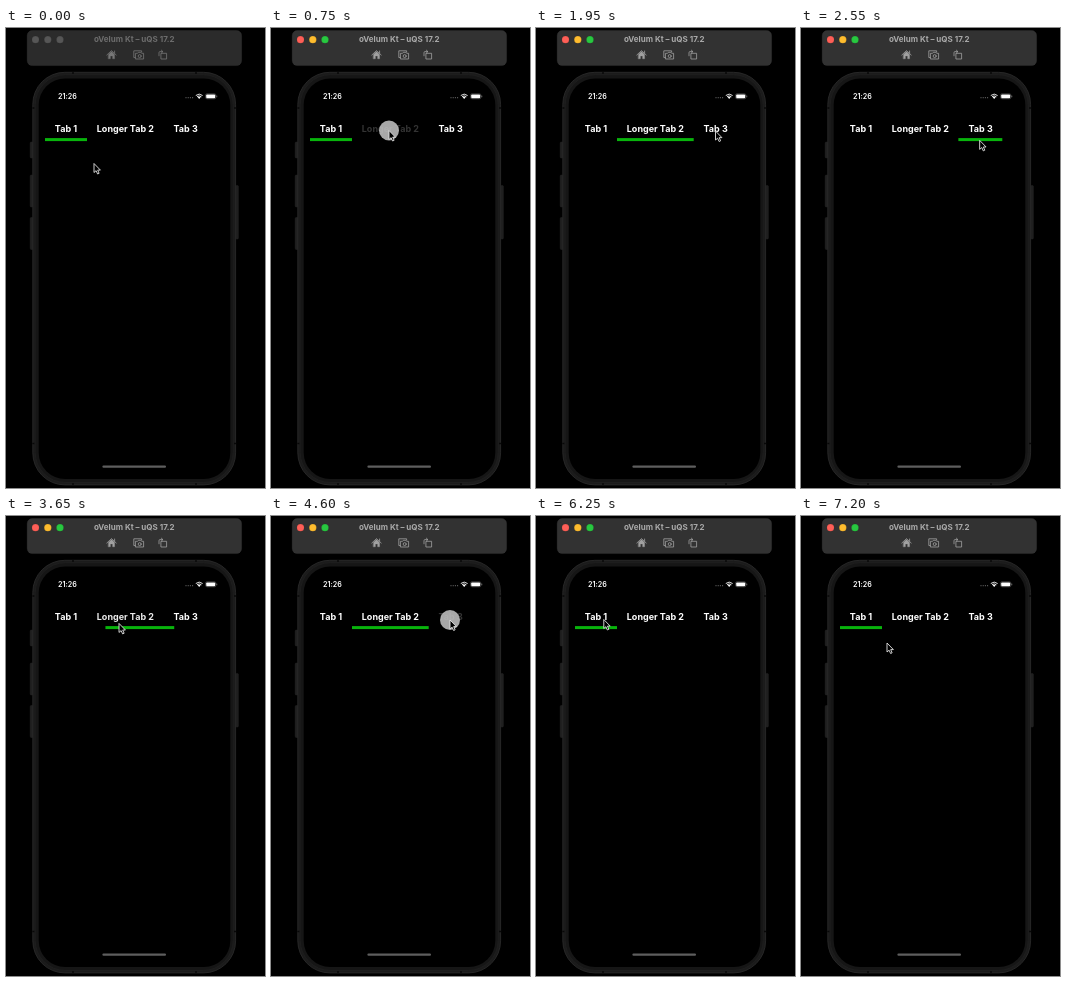
Write an HTML page that moves like this. It is 259 by 460 pixels and loops after 8.09 s.

```html
<!DOCTYPE html>
<html lang="en">
<head>
<meta charset="utf-8">
<title>Tab indicator</title>
<style>
  html, body { margin: 0; width: 100%; height: 100%; overflow: hidden; background: #000; }
  svg { display: block; width: 100vw; height: 100vh; font-family: Inter, "Open Sans", sans-serif; }
  .window { --bar: #2b2b2b; --title: #6d6d6d; --icon: #777; --r: #565656; --y: #565656; --g: #565656; }
  .window.active { --bar: #323232; --title: #aaa; --icon: #a0a0a0; --r: #fe5f57; --y: #febc2e; --g: #28c840; }
  .lights { stroke: #000; stroke-opacity: .18; stroke-width: .5; }
  .title { fill: var(--title); font-size: 8px; font-weight: 700; text-anchor: middle; }
  .icons { fill: none; stroke: var(--icon); stroke-width: .8; stroke-linejoin: round; stroke-linecap: round; }
  .tabs { fill: #fff; font-size: 9px; font-weight: 700; text-anchor: middle; }
</style>
</head>
<body>
<svg viewBox="0 0 259 460">
  <rect width="259" height="460"/>

  <g id="window" class="window">
    <rect x="21.2" y="2.6" width="214.4" height="35" rx="5" fill="var(--bar)" stroke="#3e3e3e" stroke-width=".3"/>
    <g class="lights">
      <circle cx="29.5" cy="11.7" r="3.6" fill="var(--r)"/>
      <circle cx="41.8" cy="11.7" r="3.6" fill="var(--y)"/>
      <circle cx="54" cy="11.7" r="3.6" fill="var(--g)"/>
    </g>
    <text class="title" x="128.2" y="14">oVelum Kt – uQS 17.2</text>
    <g class="icons">
      <path d="M100.8 27L105.5 22.6L110.2 27M108.6 23V25"/>
      <path d="M102.4 26.4L105.5 23.6L108.6 26.4V30.8H106.6V28H104.4V30.8H102.4Z" fill="var(--icon)" stroke-width=".3"/>
      <path d="M129.2 29.5H127.8V22.8H135.6V24M129.8 25.3H131.6L132.4 24.3H134.8L135.6 25.3H137.6V31H129.8Z"/>
      <circle cx="133.7" cy="28.1" r="1.5"/>
      <path d="M155.3 25.3H160.6V31H155.3ZM153 27.8V24.6Q153 23.6 154 23.6H156.6M155.4 22.2L156.9 23.6L155.4 25"/>
    </g>
  </g>

  <g fill="#202020" stroke="#2a2a2a" stroke-width=".4">
    <rect x="24.2" y="114" width="3" height="16" rx="1"/>
    <rect x="24.2" y="147" width="3" height="32" rx="1"/>
    <rect x="24.2" y="189.5" width="3" height="32" rx="1"/>
    <rect x="229.4" y="157.5" width="3" height="53.5" rx="1"/>
  </g>
  <rect x="26.8" y="44.3" width="202.8" height="412.6" rx="32" fill="#1b1b1b" stroke="#2a2a2a" stroke-width=".9"/>
  <rect x="29.2" y="46.7" width="198" height="407.8" rx="30" fill="#161616" stroke="#202020" stroke-width=".8"/>
  <path d="M26.4 80h2M228 80h2M26.4 415.5h2M228 415.5h2M67 44v2M67 455v2M190 44v2M190 455v2" stroke="#080808" stroke-width="1.4"/>
  <rect x="32.7" y="50.5" width="191.6" height="400.5" rx="26.5"/>

  <g fill="#fff">
    <text x="52" y="70.8" font-size="7.2" font-weight="600">21:26</text>
    <path d="M180 69.7h7" stroke="#666" stroke-width="1.2" stroke-linecap="round" stroke-dasharray="0 2.2"/>
    <path d="M191.7 69.3Q193.2 68.1 194.7 69.3L193.2 70.9Z"/>
    <path d="M189.8 67.5Q193.2 64.7 196.6 67.5M191 68.8Q193.2 67 195.4 68.8" fill="none" stroke="#fff" stroke-width=".9"/>
    <rect x="199.5" y="65.8" width="10.4" height="5" rx="1.5" fill="none" stroke="#777" stroke-width=".5"/>
    <rect x="200.2" y="66.4" width="9" height="3.8" rx=".9"/>
    <rect x="210.5" y="67.5" width=".7" height="1.7" rx=".3" fill="#888"/>
  </g>

  <g class="tabs">
    <text y="104">Tab 1</text>
    <text y="104">Longer Tab 2</text>
    <text y="104">Tab 3</text>
  </g>
  <rect id="bar" y="110.1" height="3" fill="#08b40c"/>
  <rect x="96.4" y="437.5" width="63.6" height="2.3" rx="1.1" fill="#5e5e5e"/>

  <circle id="touch" r="10" fill="#c4c4c4" fill-opacity=".86"/>
  <path id="cursor" d="M0 0V9L2.1 7.2L3.6 10.5L5.1 9.8L3.7 6.6H6.4Z" stroke="#e4e4e4" stroke-width=".9" stroke-linejoin="round"/>
</svg>

<script>
const LOOP = 8090, SLIDE = 300, FADE = 250, DIM = .2;
const $ = id => document.getElementById(id);
const win = $('window'), bar = $('bar'), touch = $('touch'), cursor = $('cursor');
const labels = [...document.querySelectorAll('.tabs text')];
const edges = [39, 81, 157.7, 201.5];

// The pointer rests at each stop from `from` to `to`, pressing `tab` if given,
// then travels on, sagging by `sag` on the way.
const stops = [
  { from: 0, to: 120, x: 88, y: 135.5, sag: 0 },
  { from: 740, to: 850, x: 118, y: 102.5, sag: 25, tab: 1 },
  { from: 2150, to: 2265, x: 181, y: 100.5, sag: 29, tab: 2 },
  { from: 3340, to: 3455, x: 112.5, y: 101.5, sag: 40, tab: 1 },
  { from: 4560, to: 4700, x: 179, y: 104, sag: 34, tab: 2 },
  { from: 5770, to: 5885, x: 67, y: 102.5, sag: 0, tab: 0 },
  { from: 7190, to: LOOP, x: 86, y: 127 }
];
const taps = stops.filter(s => 'tab' in s);

const clamp = v => Math.max(0, Math.min(1, v));
const mix = (a, b, p) => a + (b - a) * p;
const inOut = (p, n) => p < .5 ? (2 * p) ** n / 2 : 1 - (2 - 2 * p) ** n / 2;
const ramp = (t, start, length) => inOut(clamp((t - start) / length), 2);

function pointer(t) {
  const i = stops.findLastIndex(s => t >= s.from);
  const a = stops[i], b = stops[i + 1];
  if (t <= a.to || !b) return [a.x, a.y];
  const u = (t - a.to) / (b.from - a.to);
  const p = inOut(u ** 1.2, 3);
  return [mix(a.x, b.x, p), mix(a.y, b.y, p) + a.sag * Math.sin(Math.PI * u) ** 3];
}

function draw(t) {
  const alpha = labels.map(() => 1);
  let [left, right] = edges, pressed = false;

  for (const { from, to, tab } of taps) {
    if (t < from) break;
    const p = ramp(t, to, SLIDE);
    left = mix(left, edges[tab], p);
    right = mix(right, edges[tab + 1], p);
    pressed = t < to;
    alpha[tab] = pressed ? DIM : mix(DIM, 1, ramp(t, to, FADE));
  }

  const at = `translate(${pointer(t).join(' ')})`;
  win.classList.toggle('active', t >= taps[0].from);
  bar.setAttribute('x', left);
  bar.setAttribute('width', right - left);
  labels.forEach((label, i) => label.setAttribute('opacity', alpha[i]));
  touch.setAttribute('visibility', pressed ? 'visible' : 'hidden');
  touch.setAttribute('transform', at);
  cursor.setAttribute('transform', at);
}

labels.forEach((label, i) => label.setAttribute('x', (edges[i] + edges[i + 1]) / 2));

const start = performance.now();
function frame() {
  draw((performance.now() - start) % LOOP);
  requestAnimationFrame(frame);
}
frame();
</script>
</body>
</html>
```
